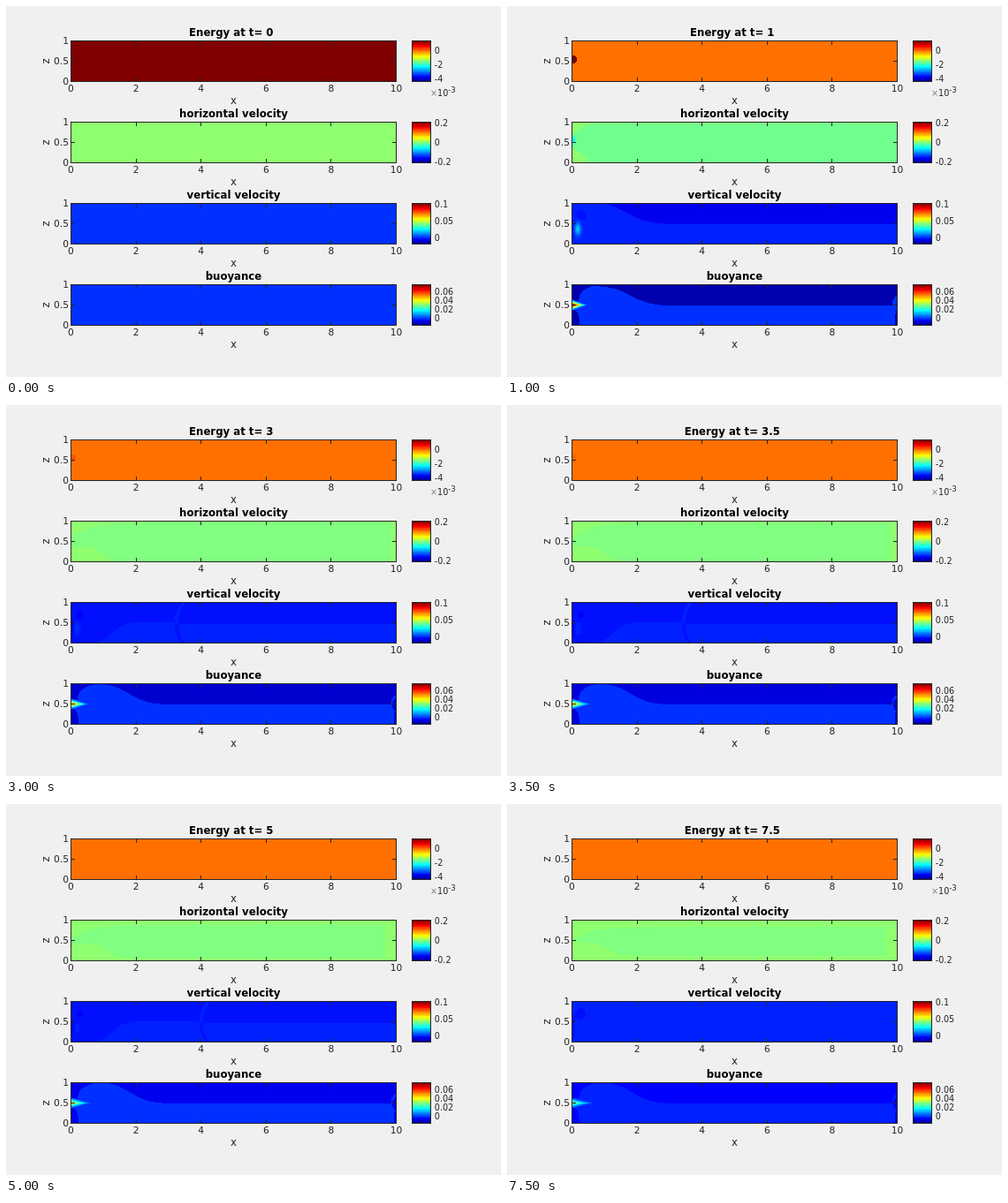
Recreate the animation shown at these times as an HTML page. Size 560 px wide and 420 px high, loop 8 s.

```html
<!DOCTYPE html>
<html lang="en">
<head>
<meta charset="utf-8">
<title>Flow fields</title>
<style>
  html, body { margin: 0; width: 100%; height: 100%; overflow: hidden; background: #f0f0f0; }
  svg { display: block; width: 560px; height: 420px; font-family: "DejaVu Sans", sans-serif; }
  text { fill: #262626; font-size: 10.67px; }
  .title { font-size: 11.73px; font-weight: bold; fill: #000; }
  .label { font-size: 11.73px; }
  .scale { font-size: 9.6px; }
  .mid { text-anchor: middle; }
  .end { text-anchor: end; }
  .line { fill: none; stroke: #262626; stroke-width: 1; shape-rendering: crispEdges; }
  .field { shape-rendering: crispEdges; }
</style>
</head>
<body>
<svg id="stage" viewBox="0 0 560 420"></svg>
<script>
const STEP = 500, STEPS = 16;
const LEFT = 73.5, TOP = 39.5, WIDTH = 368, HEIGHT = 46, PITCH = 92, MIDDLE = 23;
const stage = document.getElementById('stage');

const sigmoid = u => 1 / (1 + Math.exp(-u));
const ellipse = (x, y, cx, cy, rx, ry) => ((x - cx) / rx) ** 2 + ((y - cy) / ry) ** 2;
const bump = (...args) => Math.exp(-ellipse(...args));
const decay = (rate, k) => Math.exp(-rate * k);

// Colour scale values are levels from 0 to 64.
function jet(level) {
  const channel = centre => {
    const v = 1.5 - Math.abs(level / 16 - centre);
    return Math.round(255 * Math.max(0, Math.min(1, v)));
  };
  return `rgb(${channel(3)},${channel(2)},${channel(1)})`;
}

// Height of the layer boundary, settling at mid depth.
const shoulder = (x, gain, centre, slope) =>
  MIDDLE * (1 - gain * sigmoid((centre - x) / slope));

// Edge of the undisturbed fluid beside the inlet.
const inletEdge = y => y < 18 ? 6 + 18 * Math.exp(-y / 5) : 8 * (1 - Math.exp((26 - y) / 5));

// Each field takes the step number and returns the level at a pixel.
function energy(k) {
  const heat = Math.min(15, 15 * decay(.5, k - 2));
  const spread = 4 / k ** 2;
  return (x, y) => 49 + (ellipse(x, y, 0, 19 + spread, 5, 4 + spread) < 1 ? heat : 0);
}

function horizontal(k) {
  const margin = 7 * sigmoid((k - 9) / 1.5);
  const neck = k > 1 ? 16 + 7 * sigmoid((k - 9) / 2) : 0;
  const reach = k > 1 ? 45 - 60 / k : 42;
  const lobe = k > 1 ? 18 : 24;
  const edge = WIDTH - 15 * sigmoid((k - 6) / 1.5);
  const core = 32 - 7 * decay(2, k - 1);
  const chill = 18 * decay(.9, k - 1);
  const rough = k < 3 ? .5 : 0;
  return (x, y) => {
    const teeth = rough * x * Math.max(0, Math.cos(x * Math.PI / 2.5));
    const top = margin + (neck - margin) * Math.exp(-x / (k < 3 ? 8 : 19));
    const bottom = HEIGHT - margin - (lobe - margin * .4) * sigmoid((reach - x) / 5.5) + teeth;
    const inside = y > top && y < bottom && x < edge;
    return (inside ? core : 33) - chill * bump(x, y, 0, 19, 3, 4);
  };
}

function vertical(k) {
  const upper = k < 12 ? 9.4 - 4.4 * decay(.6, k - 1) : 10;
  const front = 76 + 7 * k;
  const jetHeat = k > 1 ? 11 * decay(.45, k - 2) : 0;
  const isLower = (x, y) => {
    if (k === 1) return y > shoulder(x, .97, 68, 12) && (y > 18 || x > inletEdge(y));
    if (k < 4) return y > shoulder(x, 1.2, 60, 13);
    const level = x < front ? 21 + 25 * sigmoid((46 - x) / 7) : MIDDLE;
    const wave = x - front - 8 * ((y - MIDDLE) / MIDDLE) ** 2;
    return (y > level) !== (Math.abs(wave) < 2);
  };
  return (x, y) => {
    let level = isLower(x, y) ? 10 : upper;
    if (k === 1) level += 45 * bump(x, y, 2, MIDDLE, 4, 4) + 14 * bump(x, y, 6, MIDDLE, 7, 5);
    level += jetHeat * bump(x, y, 5.5, 28, 3.5, 7);
    if (k > 1) level -= 1.2 * bump(x, y, 9, 13, 6, 7) + 1.2 * bump(x, y, 0, 28, 3, 12);
    return level;
  };
}

function buoyancy(k) {
  const upper = k > 1 ? 9 - 6 * decay(.13, k - 2) : 7;
  const lower = Math.round(11.4 - .07 * k);
  const gain = 1.13 - .16 * decay(.04, k * k);
  const centre = 65 + .25 * Math.abs(k - 6);
  const length = 11 + 3.1 * Math.sqrt(k);
  const heat = k > 1 ? 18 + 32 * decay(.15, k - 2) : 32;
  const isLower = (x, y) => {
    if (x > 364 && y > 31) return false;
    if (ellipse(x, y, WIDTH, MIDDLE, 5.5, 8) < 1 && (k > 3 || y > 28)) return false;
    if (ellipse(x, y, WIDTH, 22, 7, 10) < 1) return true;
    return y > shoulder(x, gain, centre, 11) && x > inletEdge(y);
  };
  return (x, y) => {
    const plume = Math.max(0, 1.1 - x / length - Math.abs(y - 22) / 5.5);
    return plume > 0 ? lower + heat * plume ** 1.2 : isLower(x, y) ? lower : upper;
  };
}

// Joins equal neighbours in each row and draws one path per level.
function paint(field) {
  const paths = {};
  for (let y = 0; y < HEIGHT - 1; y++) {
    let from = 0, current;
    for (let x = 0; x < WIDTH; x++) {
      const level = x < WIDTH - 1 ? Math.max(1, Math.min(64, Math.round(field(x, y)))) : null;
      if (level === current) continue;
      if (x > 0) paths[current] = (paths[current] || '') + `M${from} ${y}H${x}v1H${from}z`;
      from = x;
      current = level;
    }
  }
  return Object.entries(paths)
    .map(([level, d]) => `<path fill="${jet(+level)}" d="${d}"/>`).join('');
}

// Each scale lists its labels, the first label's height and the spacing.
const panels = [
  { title: 'Energy at t= 0', field: energy, rest: 64, scale: ['0', '-2', '-4'], first: 11, gap: 16 },
  { title: 'horizontal velocity', field: horizontal, rest: 33, scale: ['0.2', '0', '-0.2'], first: 1, gap: 22 },
  { title: 'vertical velocity', field: vertical, rest: 11, scale: ['0.1', '0.05', '0'], first: 1, gap: 19 },
  { title: 'buoyance', field: buoyancy, rest: 11, scale: ['0.06', '0.04', '0.02', '0'], first: 8, gap: 10.3 }
];

const text = (cls, x, y, str, extra = '') =>
  `<text class="${cls}" x="${x}" y="${y}" ${extra}>${str}</text>`;

function frame(panel, row) {
  const half = WIDTH / 2;
  let ticks = `M.5 ${MIDDLE}h4M${WIDTH - .5} ${MIDDLE}h-4`, labels = '', bar = '';
  for (let i = 0; i <= 5; i++) {
    const x = i * WIDTH / 5;
    ticks += `M${x} .5v4M${x} ${HEIGHT - .5}v-4`;
    labels += text('mid', x, 57.5, i * 2);
  }
  ['1', '0.5', '0'].forEach((s, i) => labels += text('end', -2.5, i * MIDDLE + 3.5, s));
  panel.scale.forEach((s, i) => labels += text('scale', 411.3, panel.first + i * panel.gap + 3, s));
  for (let i = 1; i < HEIGHT; i++) {
    const level = Math.ceil(64 * (1 - i / HEIGHT));
    bar += `<rect fill="${jet(level)}" x="386.5" y="${i - .5}" width="20" height="1"/>`;
  }
  return `<g transform="translate(${LEFT} ${TOP + row * PITCH})">
    <g class="field" id="field${row}" transform="translate(.5 .5)"></g>
    <g class="field">${bar}</g>
    <path class="line" d="M0 0H${WIDTH}V${HEIGHT}H0ZM386 0h21v${HEIGHT}h-21Z${ticks}"/>
    ${labels}
    ${text('title mid', row ? half : half - 2.7, -5.5, panel.title, `id="title${row}"`)}
    ${text('label mid', half, 71, 'x')}
    ${text('label mid', 0, 0, 'z', `transform="translate(-24.5 ${MIDDLE}) rotate(-90)"`)}
  </g>`;
}

stage.innerHTML = panels.map(frame).join('') +
  text('scale', 480, 101.5, '<tspan fill="#808080">×</tspan>10<tspan dy="-4" font-size="8.5">-3</tspan>');
const layers = panels.map((_, row) => document.getElementById('field' + row));
const heading = document.getElementById('title0');

let shown = -1;
function render(ms) {
  const k = Math.floor(ms / STEP) % STEPS;
  if (k === shown) return;
  shown = k;
  heading.textContent = 'Energy at t= ' + k / 2;
  panels.forEach(({ field, rest }, row) => {
    layers[row].innerHTML = paint(k ? field(k) : () => rest);
  });
}

const start = performance.now();
function tick() {
  render(performance.now() - start);
  requestAnimationFrame(tick);
}
tick();
</script>
</body>
</html>
```
